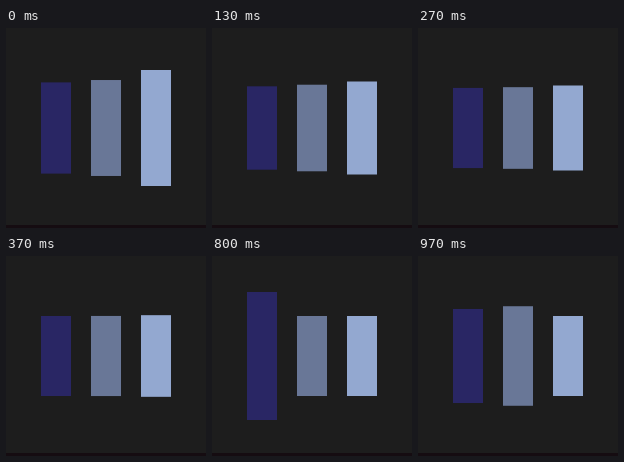
Write an HTML page that moves like this. It is 200x200 px and loops after 1 s.

```html
<!DOCTYPE html>
<html lang="en">
<head>
<meta charset="utf-8">
<title>Pulsing bars</title>
<style>
html, body { margin: 0; height: 100%; overflow: hidden; background: #1d1d1d; }
svg { display: block; width: 100%; height: 100%; }
</style>
</head>
<body>
<svg viewBox="0 0 200 200">
  <rect y="197" width="200" height="3" fill="#150c11"/>
  <rect class="bar" x="35" width="30" fill="#292664"/>
  <rect class="bar" x="85" width="30" fill="#697797"/>
  <rect class="bar" x="135" width="30" fill="#93a8d0"/>
</svg>
<script>
const LOOP = 1000, FPS = 30, REST = 60;
const bars = [...document.querySelectorAll('.bar')];
const tops = [36, 42, 42];   // y at the peak of each pulse
const leads = [0.2, 0.1, 0]; // head start in loops

// cubic-bezier(0, 0.5, 0.5, 1)
function ease(x) {
  if (x >= 1) return 1;
  let lo = 0, hi = 1;
  for (let i = 0; i < 24; i++) {
    const s = (lo + hi) / 2;
    if (1.5 * s * s - 0.5 * s ** 3 < x) lo = s; else hi = s;
  }
  return 1.5 * lo - 0.5 * lo ** 3;
}

function draw(now) {
  // the small shift rounds the steps to 30, 70, 100 ms ...
  const step = Math.floor((now % LOOP + 3.4) * FPS / 1000) % FPS;
  bars.forEach((bar, i) => {
    const phase = (step + leads[i] * FPS) % FPS / FPS;
    const y = tops[i] + (REST - tops[i]) * ease(phase * 2);
    bar.setAttribute('y', y);
    bar.setAttribute('height', 200 - 2 * y);
  });
}

let start;
function tick(now) {
  start ??= now;
  draw(now - start);
  requestAnimationFrame(tick);
}
draw(0);
requestAnimationFrame(tick);
</script>
</body>
</html>
```
